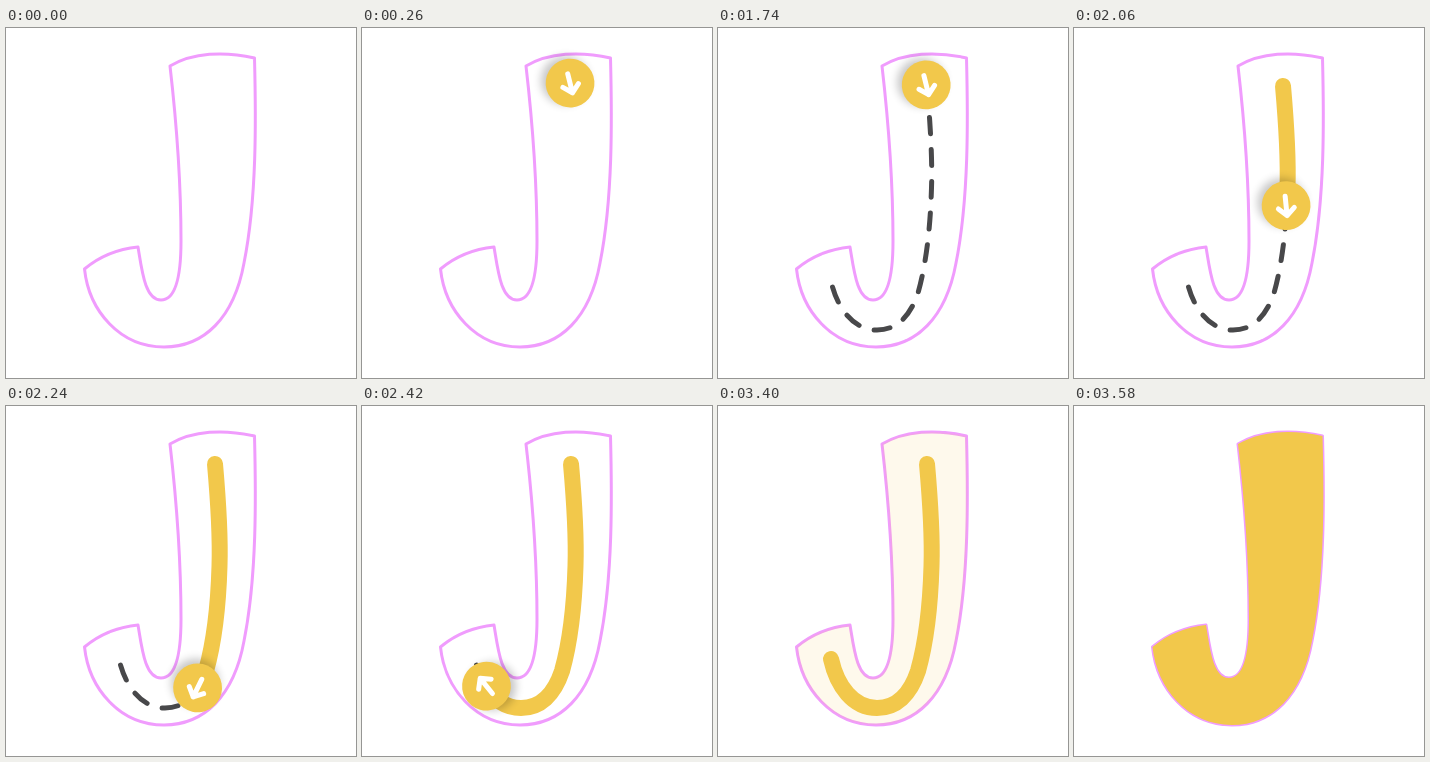
These frames come from a looping animation (350x350 px, 4800 ms). An HTML page:

```html
<!DOCTYPE html>
<html>
<head>
<meta charset="utf-8">
<style>
  html, body { margin: 0; width: 100%; height: 100%; overflow: hidden; background: #fff; }
  svg { display: block; width: 100vw; height: 100vh; fill: none; stroke-linecap: round; stroke-linejoin: round; }
</style>
</head>
<body>
<svg viewBox="0 0 350 350">
  <defs>
    <path id="letter" d="M164 38 C187 24.5 218 23 248.5 30 C250 90 251 170 238 235 C228 290 198 319 158 319
      C114 319 83 283 78.5 241 C94 228 112 221 132 219 C136 243 139 272 155 272 C172 272 175 240 175 213
      C175 150 170 90 164 38Z"/>
  </defs>
  <use href="#letter" stroke="#f09cfd" stroke-width="3"/>
  <path id="dashes" stroke="#48484a" stroke-width="5"/>
  <path id="trail" stroke="#f2c84b" stroke-width="16"/>
  <use id="fill" href="#letter" fill="#f2c84b"/>
  <g id="badge">
    <circle cx="-6" cy="5.5" r="24" fill="#000" opacity=".22" style="filter: blur(4px)"/>
    <circle cx="-3" cy=".7" r="24.4" fill="#f2c84b"/>
    <path transform="translate(-3 .7) rotate(-9)" d="M-9.5 0H10M2.5 -8L10 0L2.5 8" stroke="#fff" stroke-width="5"/>
  </g>
</svg>
<script>
const LOOP = 4800, DASH = 16, PERIOD = 31.8, DASHED = 10 * PERIOD + DASH;
const [dashes, trail, fill, badge] = ['dashes', 'trail', 'fill', 'badge'].map(id => document.getElementById(id));
const route = 'M209 58 C212 92 214.5 130 213.5 160 C212.5 195 209 233 200 265 C192 289 178 302 159 302 C135 302 119 280 113 253';
dashes.setAttribute('d', route);
trail.setAttribute('d', route);
const total = trail.getTotalLength();

const progress = (t, from, to) => Math.min(1, Math.max(0, (t - from) / (to - from)));
const ease = u => (1 - Math.cos(Math.PI * u)) / 2;
const show = (el, opacity) => el.setAttribute('opacity', opacity);

function drawDashes(length) {
  const full = Math.floor(length / PERIOD);
  const pattern = Array(full).fill(`${DASH} ${PERIOD - DASH}`);
  pattern.push(`${Math.min(DASH, length - full * PERIOD)} 999`);
  dashes.setAttribute('stroke-dasharray', pattern.join(' '));
}

function placeBadge(length) {
  const p = trail.getPointAtLength(length);
  const a = trail.getPointAtLength(Math.max(0, length - 1));
  const b = trail.getPointAtLength(Math.min(total, length + 1));
  const angle = Math.atan2(b.y - a.y, b.x - a.x) * 180 / Math.PI;
  badge.setAttribute('transform', `translate(${p.x} ${p.y}) rotate(${angle})`);
}

function render(t) {
  drawDashes(DASHED * ease(progress(t, 840, 1690)));
  show(dashes, t > 840 ? 1 : 0);

  const travelled = total * ease(progress(t, 1700, 2580));
  trail.setAttribute('stroke-dasharray', `${travelled} 999`);
  show(trail, t > 1700 ? 1 : 0);
  placeBadge(travelled);
  show(badge, progress(t, 45, 260) * (1 - progress(t, 2910, 3155)));
  show(fill, progress(t, 3380, 3580));
}

const start = performance.now();
function tick() {
  render((performance.now() - start) % LOOP);
  requestAnimationFrame(tick);
}
tick();
</script>
</body>
</html>
```
